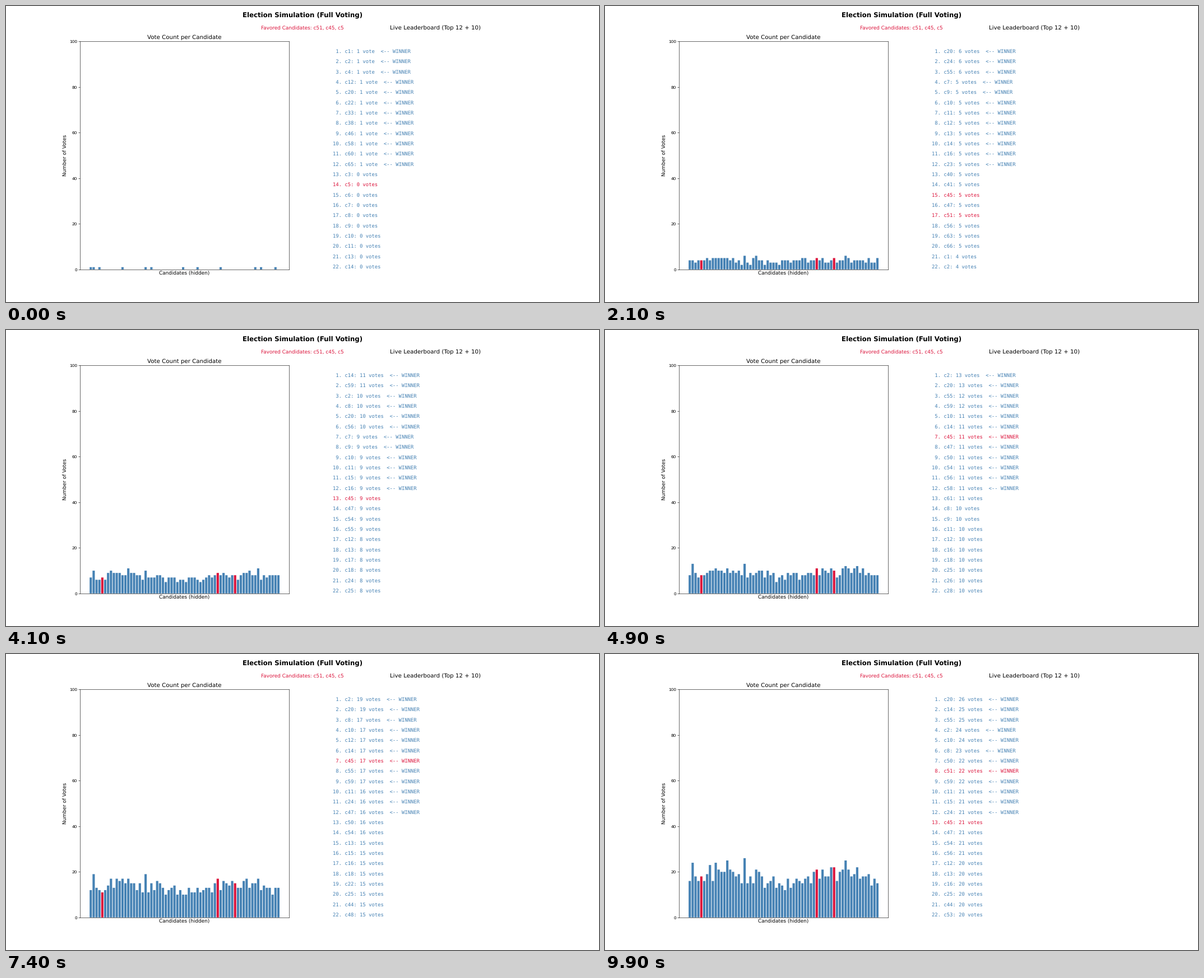
Recreate the animation shown at these times as a matplotlib script. Size 1058 px wide and 529 px high, loop 10000 ms.

```python
import matplotlib.pyplot as plt
import numpy as np
from matplotlib.animation import FuncAnimation

FRAMES, INTERVAL = 100, 100
CANDIDATES, SEATS, ROWS = 66, 12, 22
FAVORED = (51, 45, 5)
LEADERS = (20, 14, 55, 2, 10)
FIRST_BALLOT = (1, 2, 4, 12, 20, 22, 33, 38, 46, 58, 60, 65)
BLUE, RED = "steelblue", "crimson"

# Unhinted glyphs and unsnapped bars keep true widths at this low dpi.
plt.rcParams["text.hinting"] = "no_hinting"

numbers = np.arange(1, CANDIDATES + 1)


def expected_votes(rng):
    """Final votes each candidate heads for: a gentle trend, jitter and leaders."""
    trend = np.interp(numbers, [1, 15, 25, 35, 45, 55, 66], [17, 20, 19, 14, 19, 19, 17])
    votes = np.clip(trend + rng.normal(0, 2.4, CANDIDATES), 12, 22)
    votes[np.array(LEADERS) - 1] = np.linspace(25.5, 24, len(LEADERS))
    return votes * SEATS * FRAMES / votes.sum()


def simulate():
    """Running tallies; each ballot gives one vote to SEATS different candidates."""
    rng = np.random.default_rng(7)
    pace = expected_votes(rng) / FRAMES
    tally = np.isin(numbers, FIRST_BALLOT).astype(int)
    tallies = [tally]
    for ballot in range(2, FRAMES + 1):
        score = pace * ballot - tally + rng.normal(0, 2, CANDIDATES)
        tally = tally.copy()
        tally[np.argsort(-score)[:SEATS]] += 1
        tallies.append(tally)
    return tallies


def color_of(number):
    return RED if number in FAVORED else BLUE


tallies = simulate()

fig, (chart, board) = plt.subplots(1, 2, figsize=(20, 10), dpi=52.9)
fig.suptitle("Election Simulation (Full Voting)", fontsize=16, fontweight="bold")
names = ", ".join(f"c{n}" for n in FAVORED)
fig.text(0.5, 0.92, f"Favored Candidates: {names}", ha="center", fontsize=12, color=RED)

bars = chart.bar(range(CANDIDATES), tallies[0], snap=False,
                 color=[color_of(n) for n in numbers])
chart.set_ylim(0, 100)
chart.set_xticks([])
chart.set_title("Vote Count per Candidate", fontsize=14)
chart.set_xlabel("Candidates (hidden)", fontsize=12)
chart.set_ylabel("Number of Votes", fontsize=12)

board.axis("off")
board.set_title("Live Leaderboard (Top 12 + 10)", fontsize=14, pad=30)
lines = [
    board.text(0.01, 0.95 - 0.045 * row, "", fontsize=12, family="DejaVu Sans Mono")
    for row in range(ROWS)
]


def update(frame):
    tally = tallies[frame]
    for bar, votes in zip(bars, tally):
        bar.set_height(votes)
    ranking = sorted(numbers, key=lambda n: (-tally[n - 1], n))
    for rank, (line, n) in enumerate(zip(lines, ranking), 1):
        votes = tally[n - 1]
        unit = "vote" if votes == 1 else "votes"
        mark = "  <-- WINNER" if rank <= SEATS else ""
        line.set_text(f"{rank:>2}. c{n}: {votes} {unit}{mark}")
        line.set_color(color_of(n))
    return [*bars, *lines]


anim = FuncAnimation(fig, update, frames=FRAMES, interval=INTERVAL,
                     repeat=True, repeat_delay=0)
plt.show()
```
